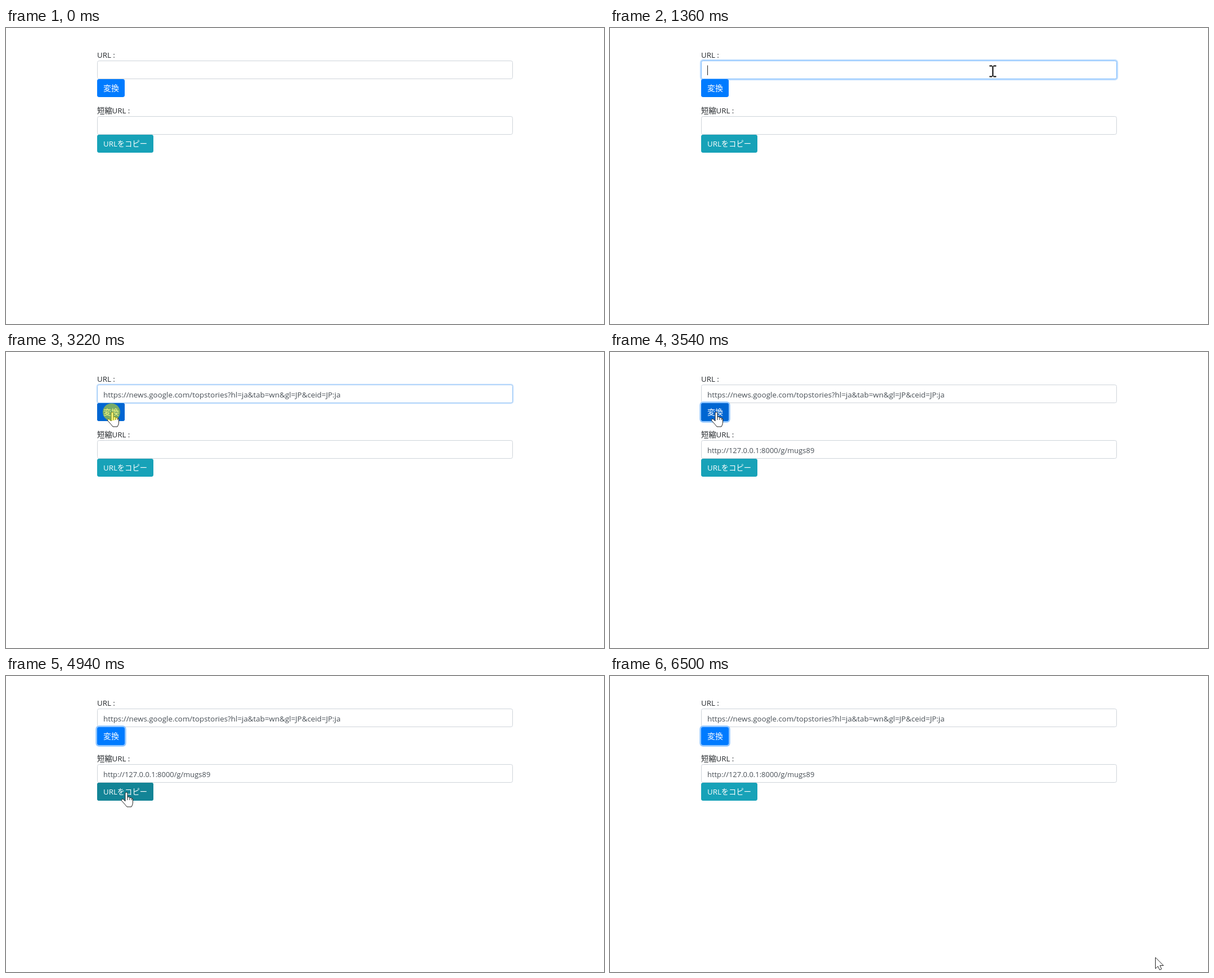
Recreate the animation shown at these times as an HTML page. Size 1063 by 527 pixels, loop 6550 ms.

```html
<!DOCTYPE html>
<html lang="ja">
<head>
<meta charset="utf-8">
<title>短縮URL</title>
<style>
  html, body { margin: 0; width: 100%; height: 100%; overflow: hidden; background: #fff; }
  svg { display: block; width: 100vw; height: 100vh; }
  text { font: 13.3px "Open Sans", "Noto Sans CJK JP", "Noto Sans CJK", sans-serif; fill: #212529; white-space: pre; }
  .value { fill: #495057; }
  .white { fill: #fff; }
  .field { width: 738px; height: 32px; rx: 3px; fill: #fff; stroke: #ced4da; }
  .button { height: 32px; rx: 3.4px; }
  .convert { width: 49px; }
  .copy { width: 100px; }
  .cursor { fill: #fff; stroke: #222; stroke-linejoin: round; }
</style>
</head>
<body>
<svg viewBox="0 0 1063 527">
  <text x="162" y="52.5">URL :</text>
  <rect id="fieldRing" class="field" x="162.5" y="58.5" style="stroke:#bfdeff"/>
  <rect class="field" x="162.5" y="58.5"/>
  <rect id="fieldBorder" class="field" x="162.5" y="58.5" style="stroke:#80bdff"/>
  <text id="url" class="value" x="173" y="80.5" style="font-size:13.37px">https://news.google.com/topstories?hl=ja&amp;tab=wn&amp;gl=JP&amp;ceid=JP:ja</text>
  <path id="spelling" fill="none" stroke="#f00" stroke-width=".9"/>
  <path id="caret" stroke="#222" d="M0 66.5V84"/>

  <rect id="convertRing" class="button convert" x="162" y="91" stroke="#93c7ff"/>
  <rect class="button convert" x="162" y="91" fill="#007bff"/>
  <rect id="convertHover" class="button convert" x="162" y="91" fill="#0066d2"/>
  <text class="white" x="173" y="112" style="font-size:13.9px">変換</text>

  <text x="162" y="151.7">短縮URL :</text>
  <rect class="field" x="162.5" y="157.5"/>
  <text id="result" class="value" x="173" y="179.7" style="font-size:12.95px">http://127.0.0.1:8000/g/mugs89</text>
  <rect class="button copy" x="162" y="190" fill="#17a2b8"/>
  <rect id="copyHover" class="button copy" x="162" y="190" fill="#138496"/>
  <text class="white" x="173" y="211">URLをコピー</text>

  <path id="arrow" class="cursor" d="M.5.5V20.5L5 16.4L8 22.7L11.4 21.2L8.6 15H14.9Z"/>
  <path id="hand" class="cursor" d="M0 16V2Q0 0 2 0T4 2V9Q8 7 8 10Q11.5 8.5 11.5 11Q13.5 10 13.5 13V18Q13.5 22 11 26H3Q0 22-6.5 15Q-7 11-3.5 12.5ZM4 9v5M8 10v4M11.5 11v3"/>
  <path id="beam" fill="none" stroke="#000" stroke-width="2" d="M-6-9.5h5M1-9.5h5M0-9V9M-6 9.5h5M1 9.5h5"/>
  <circle id="click" r="15.5" fill="#f0f000" fill-opacity=".5"/>
</svg>
<script>
  const LOOP = 6550, FADE = 150, RING = 2.7, BLINK = 530;
  const FOCUS = 1200, PASTE = 1770, CLICK = 3170, RESULT = 3450;
  const $ = id => document.getElementById(id);

  const easeOut = k => k * (2 - k);
  const smooth = k => k * k * (3 - 2 * k);

  // Each move begins where the one before it ended; bow bends its path sideways.
  const moves = [
    { start: 240, end: 240, to: [938, 500] },
    { start: 240, end: 850, to: [679, 126], ease: easeOut },
    { start: 850, end: 1150, to: [680.5, 77], ease: easeOut },
    { start: 2050, end: 2990, to: [187, 107], ease: easeOut, bow: -20 },
    { start: 4170, end: 4950, to: [212, 207], bow: -6 },
    { start: 5810, end: 5860, to: [222, 231.5] },
    { start: 5860, end: 6320, to: [864, 500] },
    { start: 6470, end: 6500, to: [969, 500.5] }
  ];

  function pointerAt(t) {
    const i = Math.max(0, moves.findLastIndex(move => t >= move.start));
    const { start, end, to, ease = smooth, bow = 0 } = moves[i];
    const from = moves[Math.max(0, i - 1)].to;
    const e = ease(Math.min(1, (t - start) / (end - start || 1)));
    const dx = to[0] - from[0], dy = to[1] - from[1];
    const side = bow * Math.sin(Math.PI * e) / (Math.hypot(dx, dy) || 1);
    return [from[0] + dx * e + dy * side, from[1] + dy * e - dx * side * -1];
  }

  // Zigzag lines under the words the spell checker rejects
  function underline(text, words) {
    let at = 0, d = '';
    for (const word of words) {
      at = text.textContent.indexOf(word, at);
      const left = text.getStartPositionOfChar(at).x;
      at += word.length;
      const right = text.getEndPositionOfChar(at - 1).x;
      d += `M${left} 83.5`;
      for (let x = left + 2, up = true; x <= right; x += 2, up = !up) d += `L${x} ${up ? 81.8 : 83.5}`;
    }
    return d;
  }
  $('spelling').setAttribute('d', underline($('url'), ['https', 'topstories', 'hl', 'ja', 'wn', 'gl', 'ceid', 'JP:ja']));
  const urlEnd = 173 + $('url').getComputedTextLength();

  const between = (v, from, to) => v >= from && v < to;
  const ramp = (t, start) => smooth(Math.min(1, Math.max(0, (t - start) / FADE)));
  const pulse = (t, on, off) => ramp(t, on) - ramp(t, off);
  const fade = (id, opacity) => { $(id).style.opacity = opacity; };
  const show = (id, visible) => { $(id).style.display = visible ? '' : 'none'; };
  const place = (id, x, y) => $(id).setAttribute('transform', `translate(${x} ${y})`);
  const spread = (id, amount) => {
    fade(id, amount);
    $(id).style.strokeWidth = 2 * RING * amount;
  };

  function cursorFor(x, y) {
    const onConvert = between(x, 162, 211) && between(y, 91, 123);
    const onCopy = between(x, 162, 262) && between(y, 190, 222);
    if (onConvert || onCopy) return 'hand';
    const onField = between(x, 162, 901) && (between(y, 58, 91) || between(y, 157, 190));
    return onField ? 'beam' : 'arrow';
  }

  function draw(t) {
    const focus = pulse(t, FOCUS, CLICK);
    spread('fieldRing', focus);
    fade('fieldBorder', focus);
    spread('convertRing', ramp(t, CLICK + 40));
    fade('convertHover', pulse(t, 2780, 4370));
    fade('copyHover', pulse(t, 4740, 5860));

    const pasted = t >= PASTE;
    const blinkOn = !pasted || Math.floor((t - PASTE) / BLINK) % 2 === 0;
    show('url', pasted);
    show('spelling', between(t, PASTE + 50, CLICK));
    show('result', t >= RESULT);
    show('caret', between(t, FOCUS, CLICK) && blinkOn);
    place('caret', pasted ? urlEnd : 173.5, 0);

    const [x, y] = pointerAt(t);
    const cursor = cursorFor(x, y);
    for (const id of ['arrow', 'hand', 'beam']) {
      show(id, t >= moves[0].start && id === cursor);
      place(id, x, y);
    }
    show('click', between(t, FOCUS, FOCUS + 140) || between(t, CLICK, CLICK + 200));
    place('click', x + 0.5, y);
  }

  const start = performance.now();
  function tick() {
    draw((performance.now() - start) % LOOP);
    requestAnimationFrame(tick);
  }
  tick();
</script>
</body>
</html>
```
